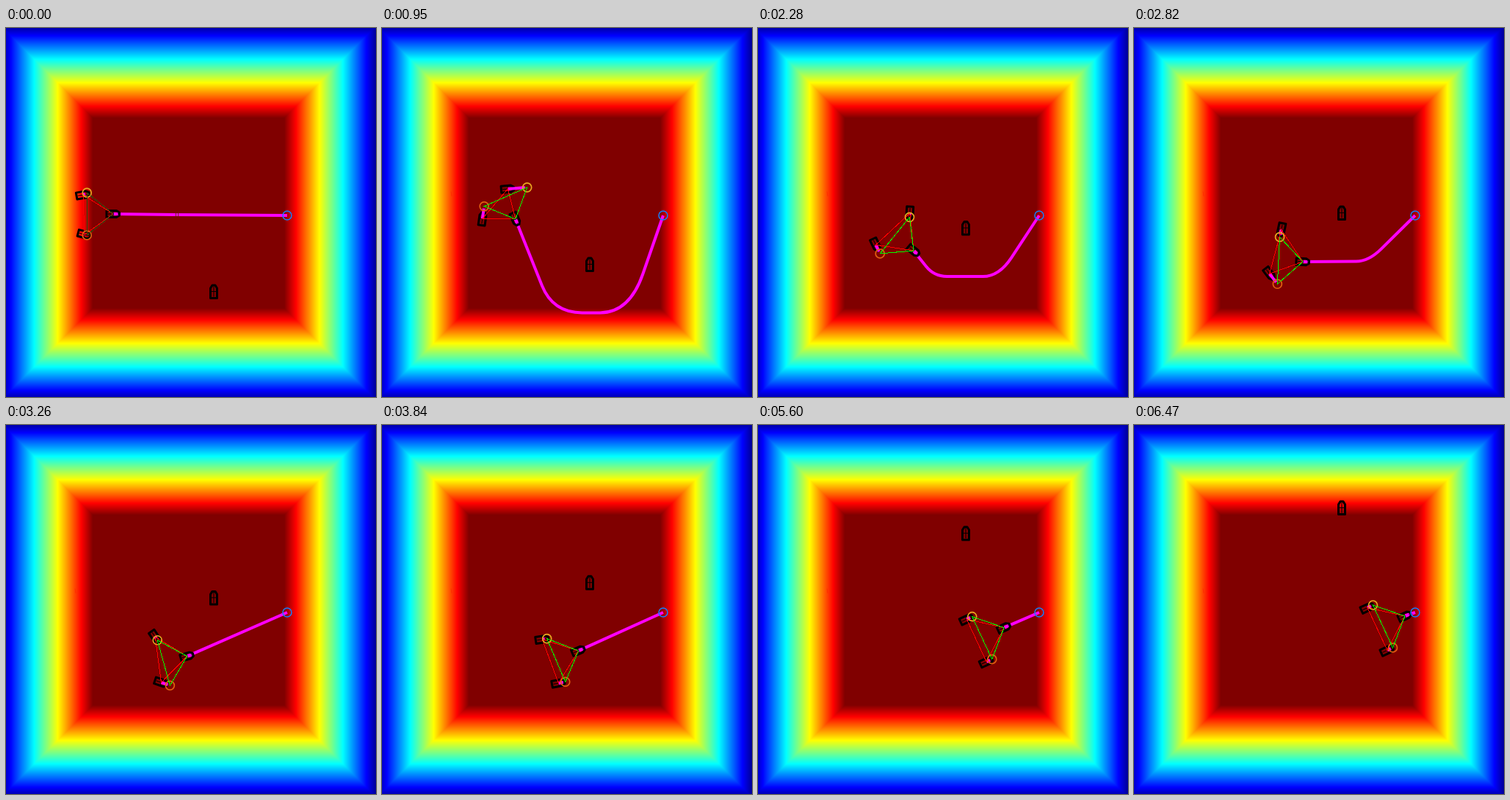
An HTML page that plays this animation: 504x502 px, repeating every 6590 ms.

```html
<!DOCTYPE html>
<html lang="en">
<head>
<meta charset="utf-8">
<title>Formation around a moving obstacle</title>
<style>
html, body { margin: 0; width: 100%; height: 100%; overflow: hidden; background: #000080; }
svg { display: block; width: 504px; height: 502px; }
</style>
</head>
<body>
<svg id="stage" viewBox="0 0 504 502" fill="none">
  <g id="field"></g>
  <path id="speck" d="M94 222.5L95 229" stroke="#ff2000" stroke-opacity=".6"/>
  <path id="route" stroke="#f0f" stroke-width="4" stroke-linejoin="round"/>
  <path id="ticks" d="M231.5 252V256M234.5 252V256" stroke="#6b3a10"/>
  <g id="boats"></g>
  <path id="links" stroke="#f0f" stroke-width="4"/>
  <path id="actual" stroke="#f00" shape-rendering="crispEdges"/>
  <circle id="slot1" r="6" stroke="#e8a820" stroke-width="1.7"/>
  <circle id="slot2" r="6" stroke="#e06010" stroke-width="1.7"/>
  <path id="wanted" stroke="#0f0" shape-rendering="crispEdges"/>
  <circle cx="383" cy="255" r="6" stroke="#1480ff" stroke-width="1.5"/>
</svg>
<script>
const LOOP = 6590, STEPS = 60, GOAL = [383, 255];
const REPLAN = 8, CLEAR = 30;   // steps at which the route changes kind
const ARM = 46, GAIN = 0.36;    // formation size, how fast followers close in

// Leader's turning points: step, x, y
const course = [[0, 146, 253], [8, 180, 256], [16, 194, 288], [26, 230, 318], [32, 255, 313], [59, 369, 260]];

const $ = id => document.getElementById(id);
const set = (el, attrs) => { for (const a in attrs) el.setAttribute(a, attrs[a]); };
const add = (parent, tag, attrs) => {
  const el = document.createElementNS('http://www.w3.org/2000/svg', tag);
  set(el, attrs);
  return parent.appendChild(el);
};

const rad = a => a * Math.PI / 180;
const mix = (a, b, f) => a.map((v, i) => v + (b[i] - v) * f);
const polar = ([x, y], r, a) => [x + r * Math.cos(rad(a)), y + r * Math.sin(rad(a))];
const angle = (a, b) => Math.atan2(b[1] - a[1], b[0] - a[0]) * 180 / Math.PI;
const toward = (a, b, d) => mix(a, b, Math.min(1, d / (Math.hypot(b[0] - a[0], b[1] - a[1]) || 1)));
const fmt = p => p.map(v => v.toFixed(2)).join(' ');
const line = pts => 'M' + pts.map(fmt).join('L');

function jet(v) {
  const channel = c => Math.round(255 * Math.max(0, Math.min(1, 1.5 - Math.abs(4 * v - c))));
  return `rgb(${channel(3)},${channel(2)},${channel(1)})`;
}

function buildField() {
  const depth = 128, left = 118, top = 122, right = 379.5, bottom = 381.5;
  for (let i = 0; i <= depth; i++) {
    const m = depth - i;
    add($('field'), 'rect', {
      x: left - m, y: top - m, width: right - left + 2 * m, height: bottom - top + 2 * m, fill: jet(i / depth)
    });
  }
}

function makeBoat() {
  const g = add($('boats'), 'g', { stroke: '#000' });
  add(g, 'path', { d: 'M-9 -4.5H4.5L8.5 -2V2L4.5 4.5H-9Z', 'stroke-width': 3, 'stroke-linejoin': 'round' });
  add(g, 'path', { d: 'M-7 0H7M0 -4V4' });
  return g;
}

function leaderAt(k) {
  const i = Math.max(1, course.findIndex(c => c[0] >= k));
  const [a, b] = [course[i - 1], course[i]];
  const at = mix(a, b, (k - a[0]) / (b[0] - a[0])).slice(1);
  // Dives off at the replanning, then turns smoothly to the goal
  const dir = k < REPLAN ? 0 : 92 / (1 + Math.exp((k - 23.5) / 3)) - 25;
  return { at, dir };
}

function slotsAt(k, { at, dir }) {
  const half = 39 + 5 * Math.min(k / REPLAN, 1);
  return [half, -half].map(h => polar(at, ARM, dir + 180 + h));
}

// Each follower closes a fixed share of the gap to its slot on every step
function simulate() {
  let crew = [{ at: [105, 227], dir: -10 }, { at: [107, 281], dir: 15 }];
  return Array.from({ length: STEPS }, (_, k) => {
    const lead = leaderAt(k), slots = slotsAt(k, lead);
    if (k) crew = crew.map((b, i) => ({ at: mix(b.at, slots[i], GAIN), dir: angle(b.at, slots[i]) }));
    return { team: [lead, ...crew], slots };
  });
}

const obstacleY = k => 358.5 - 4.12 * k - 0.2 * Math.max(0, k - 45);

// Straight at first, then a rounded detour below the obstacle
function routeAt(k, from) {
  if (k < REPLAN) return line([from, [232, 254], GOAL]);
  if (k >= CLEAR) return line([from, GOAL]);
  const flat = obstacleY(k) + 66, r = 40 * Math.exp((9 - k) / 20);
  const drop = flat - from[1], dips = drop > 4;
  const a = [from[0] + drop * (0.4 + 0.033 * (k - 9)), flat];
  const b = [337 - 0.06 * (k - 9) ** 2, flat];
  const bend = (prev, c, next, lead, out) =>
    `L${fmt(toward(c, prev, lead))}Q${fmt(c)} ${fmt(toward(c, next, out))}`;
  const first = Math.min(r, drop / 2);
  return 'M' + fmt(from) + (dips ? bend(from, a, b, first, first) : '') +
    bend(dips ? a : from, b, GOAL, r, 1.4 * r) + 'L' + fmt(GOAL);
}

buildField();
const boats = [0, 1, 2, 3].map(makeBoat);
const states = simulate();
const place = (el, [x, y], dir) => set(el, { transform: `translate(${x} ${y}) rotate(${dir})` });

function draw(t) {
  const k = Math.min(STEPS - 1, Math.floor((t + 48) / 110.3));
  const { team, slots } = states[k], [lead, ...crew] = team;

  team.forEach((b, i) => place(boats[i], b.at, b.dir));
  place(boats[3], [283, obstacleY(k)], -90);

  const links = crew.map((b, i) => line([b.at, toward(slots[i], b.at, 3)]));
  links.push(line([polar(lead.at, 1, lead.dir), polar(lead.at, 6, lead.dir)]));
  set($('links'), { d: links.join('') });
  set($('route'), { d: routeAt(k, lead.at) });
  set($('actual'), { d: line(team.map(b => b.at)) + 'Z' });
  set($('wanted'), { d: line([lead.at, ...slots]) + 'Z', stroke: k ? '#0f0' : '#2c5010' });
  slots.forEach(([x, y], i) => set($('slot' + (i + 1)), { cx: x, cy: y }));
  set($('ticks'), { visibility: k < REPLAN ? 'visible' : 'hidden' });
  set($('speck'), { visibility: k ? 'visible' : 'hidden' });
}

const start = performance.now();
function tick() {
  draw((performance.now() - start) % LOOP);
  requestAnimationFrame(tick);
}
tick();
</script>
</body>
</html>
```
